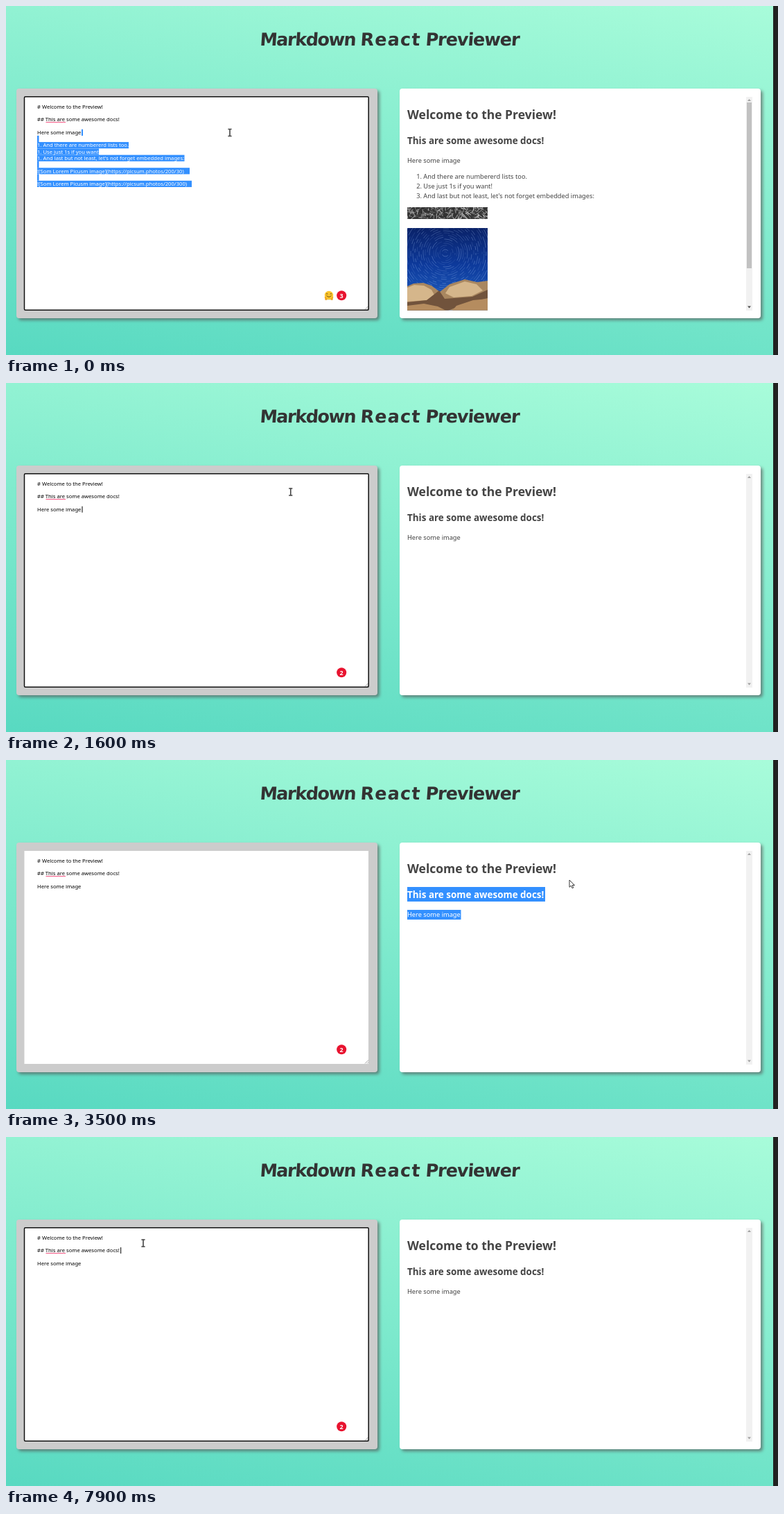
Animation of 1114 by 503 pixels, one loop 8 s. Source, as an HTML page:

```html
<!DOCTYPE html>
<html lang="en">
<head>
<meta charset="utf-8">
<title>Markdown React Previewer</title>
<style>
html, body { margin: 0; width: 100%; height: 100%; overflow: hidden; }
body { background: linear-gradient(10deg, #58d9c1, #a8fcda); }
svg { display: block; width: 1114px; height: 503px; font-family: "Noto Sans", "Open Sans", sans-serif; }
.card { filter: drop-shadow(3px 3px 2px #555a); }
.title { font: bold 25.4px "DejaVu Sans", sans-serif; fill: #333; }
.raw { font-size: 7.65px; }
.view { font-size: 9.26px; fill: #444; }
.badge { font-size: 9px; font-weight: bold; fill: #fff; text-anchor: middle; }
.sel { fill: #3390ff; }
</style>
</head>
<body>
<svg viewBox="0 0 1114 503">
  <defs>
    <linearGradient id="sky" x2="0" y2="1">
      <stop stop-color="#0a2268"/><stop offset=".45" stop-color="#0d3a9c"/><stop offset="1" stop-color="#2465c4"/>
    </linearGradient>
    <clipPath id="stripClip"><rect x="579" y="290" width="116" height="17"/></clipPath>
    <clipPath id="skyClip"><rect x="579" y="320" width="116" height="118.5"/></clipPath>
  </defs>
  <rect x="1107" width="7" height="503" fill="#212121"/>
  <g class="title" transform="translate(0 57) skewX(-4)">
    <text x="366" letter-spacing="-1.4">Markdown</text>
    <text x="511" letter-spacing="1.2">React</text>
    <text x="605" letter-spacing="-1">Previewer</text>
  </g>

  <rect class="card" x="15" y="119" width="521" height="331" rx="4" fill="#ccc"/>
  <rect class="card" x="568" y="119" width="521" height="331" rx="4" fill="#fff"/>
  <rect x="26.5" y="131" width="496.5" height="307" fill="#fff"/>
  <path d="M518 437.5l5-5M521 437.5l2-2" stroke="#777" stroke-width=".7"/>
  <rect id="focus" x="26.5" y="130.7" width="496.7" height="307.6" rx="1.5" fill="none" stroke="#101010" stroke-width="1.5"/>
  <g id="raw" class="raw"></g>
  <path d="M57.5 167.6H86" stroke="#f56a92" stroke-width="1.2"/>
  <rect id="caret" y="159" width="1" height="9"/>

  <g id="emoji">
    <path d="M460 418h12v6h-12z" fill="#eee"/>
    <circle cx="466" cy="417" r="6.2" fill="#fbc52d"/>
    <path d="M462 415.3q1.2-1.6 2.4 0M467.6 415.3q1.2-1.6 2.4 0M462.5 417.5q3.5 3.6 7 0" fill="none" stroke="#5b3a12" stroke-width=".9"/>
    <path d="M459.6 419q3 0 4.2 4.5l-3 .6zM472.4 419q-3 0-4.2 4.5l3 .6z" fill="#f1a51f"/>
  </g>
  <circle cx="484.2" cy="417.3" r="7" fill="#e8132f"/>
  <text id="count" class="badge" x="484.2" y="420.6"></text>
  <path id="spin" d="M484.2 413.7a3.6 3.6 0 0 1 0 7.2" fill="none" stroke="#fff" stroke-width="1.1"/>

  <rect x="1068" y="131" width="9" height="308" fill="#f1f1f1"/>
  <path d="M1070 137l2.5-3 2.5 3z" fill="#a0a0a0"/>
  <path id="down" d="M1070 432.5l2.5 3 2.5-3z"/>
  <g id="viewSel" class="sel">
    <rect x="579" y="183" width="199" height="21"/>
    <rect x="579" y="216" width="77.5" height="14"/>
  </g>
  <g class="view">
    <text x="579" y="163" font-size="17.5" font-weight="600">Welcome to the Preview!</text>
    <text id="head" x="579" y="198.8" font-size="13.45" font-weight="600">This are some awesome docs!</text>
    <text id="para" x="579" y="226">Here some image</text>
  </g>
  <g id="extra">
    <rect x="1069" y="139" width="7" height="239" fill="#c1c1c1"/>
    <g id="list" class="view"></g>
    <g clip-path="url(#stripClip)">
      <rect x="579" y="290" width="116" height="17" fill="#333"/>
      <g id="grass" stroke-width=".8"></g>
    </g>
    <g clip-path="url(#skyClip)">
      <rect x="579" y="320" width="116" height="119" fill="url(#sky)"/>
      <g id="stars" fill="none" stroke="#a9c6f5" stroke-width=".6"></g>
      <path d="M579 404l9-4 14-1 12 4 12 9 14-11 22-7 18 4 15-2v44H579z" fill="#a98760"/>
      <path d="M579 406l10-4 14 1 11 6 5 9-12 6-28 2zM640 405l22-8 17 4 9 9-16 8-26 2-12-6z" fill="#d5b68b"/>
      <path d="M579 427l28-3 18-14 8 12 40-3 22-10v12l-32 8-25 10h-59z" fill="#71533c"/>
      <path d="M579 432l24-3 20 4 12 6h-56zM650 432l24-8 21-2v17h-51z" fill="#b58c5f"/>
    </g>
  </g>

  <path id="beam" d="M-2.6-5h2L0-4.5.6-5h2M0-4.5v9M-2.6 5h2L0 4.5.6 5h2" fill="none" stroke="#444" stroke-width="1.6"/>
  <path id="arrow" d="M0 0V10.3L2.4 8.1 4.1 11.8 5.8 11 4.2 7.5H7.4Z" fill="#fff" stroke="#222" stroke-width=".9"/>
</svg>
<script>
const $ = id => document.getElementById(id);
const show = (id, on) => $(id).style.display = on ? '' : 'none';

let seed = 7;
const rand = () => (seed = seed * 16807 % 2147483647) / 2147483647;

const items = [
  'And there are numbererd lists too.',
  'Use just 1s if you want!',
  "And last but not least, let's not forget embedded images:"
];
const link = size => `![Som Lorem Picusm image](https://picsum.photos/200/${size})`;
const lines = ['# Welcome to the Preview!', '', '## This are some awesome docs!', '', 'Here some image', '',
  ...items.map(s => '1. ' + s), '', link(30), '', link(300)];
// right edge of the selection on each line below the fifth
const selEnds = [47.5, 177, 134, 257.5, 47.5, 265, 47.5, 268];
const pitch = 9.28;

const rawLine = (s, i, fill) => `<text x="45" y="${147.8 + i * pitch}" fill="${fill}">${s}</text>`;
$('raw').innerHTML = lines.slice(0, 5).map((s, i) => rawLine(s, i, '#000')).join('') +
  '<g id="rawSel"><rect class="sel" x="109" y="177.7" width="2" height="9.3"/>' +
  selEnds.map((end, i) => `<rect class="sel" x="45" y="${186.8 + i * pitch}" width="${end - 45}" height="9.2"/>`).join('') +
  lines.slice(5).map((s, i) => rawLine(s, i + 5, '#fff')).join('') + '</g>';

$('list').innerHTML = items.map((s, i) => {
  const y = 249 + i * 14;
  return `<text x="600" y="${y}" text-anchor="end">${i + 1}.</text><text x="602.3" y="${y}">${s}</text>`;
}).join('');

$('grass').innerHTML = Array.from({ length: 260 }, () => {
  const x = 575 + rand() * 124, y = 288 + rand() * 20, g = 70 + rand() * 170 | 0;
  return `<path d="M${x} ${y}l${rand() * 16 - 8} ${rand() * 16 - 8}" stroke="rgb(${g},${g},${g})"/>`;
}).join('');

$('stars').innerHTML = Array.from({ length: 26 }, (_, i) =>
  `<circle cx="634" cy="356" r="${2 + i * 3}" stroke-opacity="${.2 + rand() * .35}"
    stroke-dasharray="${4 + rand() * 14} ${3 + rand() * 9}" stroke-dashoffset="${rand() * 30}"/>`).join('');

// time, x, y
const path = [
  [0, 323, 182.5], [100, 323, 182.5], [900, 304, 198], [1000, 303, 196], [1500, 335, 146], [1900, 638, 190],
  [2000, 715, 222], [2100, 731, 212], [2200, 731, 212], [2400, 690, 183], [3100, 690, 183],
  [3500, 813, 173], [5600, 813, 173], [5700, 586, 105], [5800, 230, 150],
  [5900, 230, 150], [6200, 160, 164], [6300, 158, 163], [6500, 161, 162], [6800, 198, 153], [8000, 198, 153]
];

const deleted = 200, checked = 1500, blur = 3200, selected = 3300, focused = 6300;
// time, caret x (0 = hidden), caret top; it blinks every 600 ms
const carets = [
  [0, 0], [deleted, 109.5, 177.7], [800, 0], [1400, 109.5, 177.7], [2000, 0], [focused, 156.3, 159], [6900, 0],
  [7500, 156.3, 159], [7600, 160.5, 159], [7700, 164, 159], [7900, 165.2, 159]
];

function pointer(t) {
  const i = path.findIndex(p => p[0] > t);
  const [t0, x0, y0] = path[i - 1], [t1, x1, y1] = path[i];
  const k = (t - t0) / (t1 - t0);
  return [x0 + (x1 - x0) * k, y0 + (y1 - y0) * k];
}

function draw() {
  const t = Math.floor(performance.now() % 8000 / 100) * 100;
  const full = t < deleted, busy = !full && t < checked;
  const viewSel = t >= selected && t < focused;

  show('rawSel', full);
  show('extra', full);
  $('down').setAttribute('fill', full ? '#505050' : '#a0a0a0');
  show('focus', t < blur || t >= focused);
  show('emoji', t < checked);
  show('spin', busy);
  $('spin').setAttribute('transform', `rotate(${(t - 900) * .45} 484.2 417.3)`);
  $('count').textContent = busy ? '' : full ? 3 : 2;

  show('viewSel', viewSel);
  $('head').style.fill = $('para').style.fill = viewSel ? '#fff' : '';

  const [, cx, cy] = carets.filter(c => c[0] <= t).pop();
  show('caret', cx);
  if (cx) {
    $('caret').setAttribute('x', cx);
    $('caret').setAttribute('y', cy);
  }

  const [x, y] = pointer(t);
  const overText = x > 27 && x < 523;
  show('beam', overText);
  show('arrow', !overText);
  $(overText ? 'beam' : 'arrow').setAttribute('transform', `translate(${x} ${y})`);
  requestAnimationFrame(draw);
}
draw();
</script>
</body>
</html>
```
